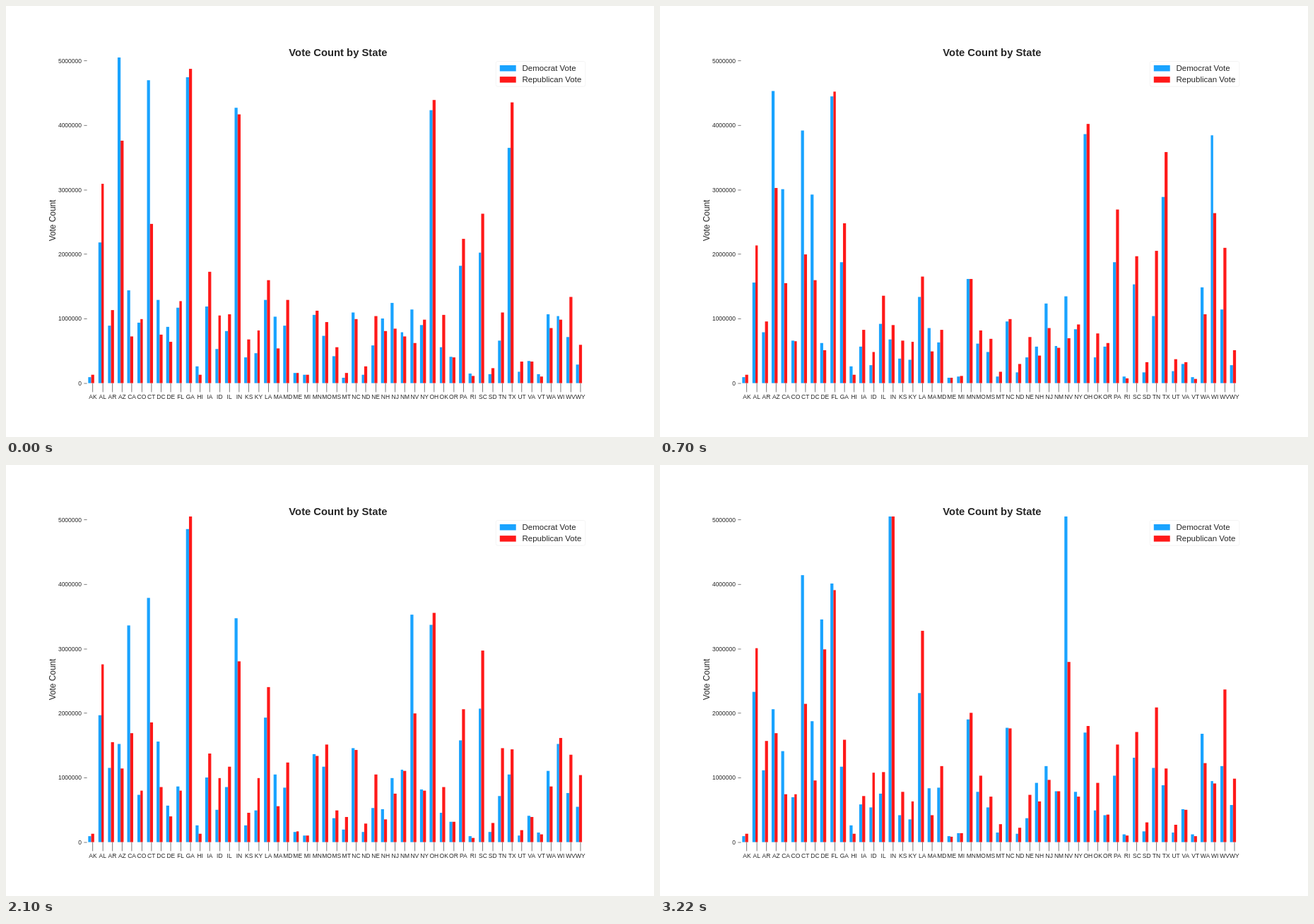
These frames come from a looping animation (917x611 px, 3.5 s). An HTML page with a canvas:

```html
<!DOCTYPE html>
<html lang="en">
<head>
<meta charset="utf-8">
<title>Vote Count by State</title>
<style>
  html, body { margin: 0; width: 100%; height: 100%; overflow: hidden; background: #fff; }
  canvas { display: block; }
</style>
</head>
<body>
<canvas id="chart" width="917" height="611"></canvas>
<script>
const ctx = document.getElementById('chart').getContext('2d');

// The chart is laid out on a 1080 x 720 page, scaled down to the canvas.
const W = 1080, H = 720;
const HOLD = 700;
const BLUE = '#19a3ff', RED = '#ff1919', INK = '#262626', TICK = '#666';
const LEFT = 135, RIGHT = 972, TOP = 86.4, BASE = 630;
const STEP = (RIGHT - LEFT) / 51.5, BAR = STEP * 0.3, FIRST = LEFT + STEP * 0.6;
const LIMIT = 505; // votes are counted in units of 10,000
const UNIT = (BASE - TOP) / LIMIT;

const words = str => str.split(' ');
const states = words('AK AL AR AZ CA CO CT DC DE FL GA HI IA ID IL IN KS KY LA MA MD ME MI MN MO MS ' +
  'MT NC ND NE NH NJ NM NV NY OH OK OR PA RI SC SD TN TX UT VA VT WA WI WV WY');

// Typical Democrat vote, and Republican votes per Democrat vote, by group of states.
const sizes = [
  [14, words('ME MI MT ND RI SD UT VT')],
  [42, words('ID KS KY MS NE OK OR VA WY')],
  [150, words('AL AZ CA DC GA LA MN NC NJ NV OH PA SC WA WI')],
];
const leans = [
  [0.53, words('CA CT DC MA NV')],
  [0.75, words('AZ DE NH NJ RI VT WA')],
  [1.35, words('AL AR GA IA IL IN LA MD MO MS PA SC TX')],
  [1.85, words('ID KS KY MT ND NE OK SD TN UT WV WY')],
];
const groupValue = (groups, state, fallback) =>
  (groups.find(([, members]) => members.includes(state)) || [fallback])[0];

// Leading states of each round as [Democrat, Republican]; two states never change.
const steady = { AK: [9.4, 12.9], HI: [26.4, 13] };
const rounds = [
  { AL: [218, 309], AZ: [505, 376], CT: [470, 247], GA: [475, 488], IN: [427, 417], OH: [424, 439], TX: [365, 436] },
  { AZ: [453, 303], CA: [301, 155], CT: [392, 200], DC: [293, 160], FL: [445, 452], OH: [386, 402], TX: [289, 359], WI: [385, 264] },
  { CA: [505, 343], DE: [286, 243], FL: [439, 437], IL: [320, 233], NY: [378, 208], TX: [355, 417] },
  { CA: [336, 169], CT: [379, 186], GA: [486, 505], IN: [347, 281], NV: [353, 200], OH: [337, 356] },
  { AL: [233, 301], CT: [414, 215], DE: [346, 299], FL: [401, 391], IN: [505, 505], LA: [231, 328], NV: [505, 280] },
];

function random(seed) {
  const n = Math.sin(seed * 12.9898) * 43758.5453;
  return n - Math.floor(n);
}

function votes(state, i, round) {
  const known = steady[state] || rounds[round][state];
  if (known) return known;
  const seed = round * states.length + i + 1;
  const democrat = groupValue(sizes, state, 85) * (0.6 + 0.8 * random(seed));
  const republican = democrat * groupValue(leans, state, 1) * (0.9 + 0.2 * random(seed + 500));
  return [democrat, republican];
}

const results = rounds.map((_, round) => states.map((state, i) => votes(state, i, round)));

function text(str, x, y, size, align = 'left', weight = '') {
  ctx.font = `${weight} ${size}px "Liberation Sans", Arial, sans-serif`;
  ctx.textAlign = align;
  ctx.fillStyle = INK;
  ctx.fillText(str, x, y);
}

function rect(color, x, y, w, h) {
  ctx.fillStyle = color;
  ctx.fillRect(x, y, w, h);
}

function drawBar(color, x, value) {
  const left = Math.round(x), right = Math.round(x + BAR);
  const top = Math.round(BASE - Math.min(value, LIMIT) * UNIT);
  rect(color, left, top, right - left, BASE - top);
}

function drawBars(result) {
  result.forEach(([democrat, republican], i) => {
    const middle = FIRST + i * STEP - BAR / 2;
    drawBar(BLUE, middle - BAR, democrat);
    drawBar(RED, middle, republican);
  });
}

function drawAxes() {
  for (let million = 0; million <= 5; million++) {
    const y = BASE - million * 100 * UNIT;
    rect(TICK, LEFT - 5, Math.floor(y), 5, 1);
    text(million * 1e6, 126, y + 3.6, 10, 'right');
  }
  states.forEach((state, i) => {
    const x = FIRST + i * STEP;
    rect(TICK, Math.floor(x), BASE, 1, 15);
    text(state, x, 656.2, 10, 'center');
  });

  text('Vote Count by State', (LEFT + RIGHT) / 2, 83.4, 17.4, 'center', 'bold');

  ctx.save();
  ctx.translate(82, (TOP + BASE) / 2);
  ctx.rotate(-Math.PI / 2);
  text('Vote Count', 0, 0, 14, 'center');
  ctx.restore();
}

function drawLegend() {
  ctx.beginPath();
  ctx.roundRect(816.5, 92.5, 149, 42, 3);
  ctx.fillStyle = '#fff';
  ctx.fill();
  ctx.strokeStyle = '#f3f3f3';
  ctx.lineWidth = 1;
  ctx.stroke();
  [['Democrat Vote', BLUE], ['Republican Vote', RED]].forEach(([label, color], row) => {
    const y = 99 + row * 19;
    rect(color, 823, y, 27, 10);
    text(label, 860.3, y + 9.4, 13.57);
  });
}

const start = performance.now();

function draw(now) {
  const elapsed = Math.max(0, now - start);
  ctx.setTransform(917 / W, 0, 0, 611 / H, 0, 0);
  rect('#fff', 0, 0, W, H);
  drawBars(results[Math.floor(elapsed / HOLD) % results.length]);
  drawAxes();
  drawLegend();
  requestAnimationFrame(draw);
}
draw(start);
</script>
</body>
</html>
```
